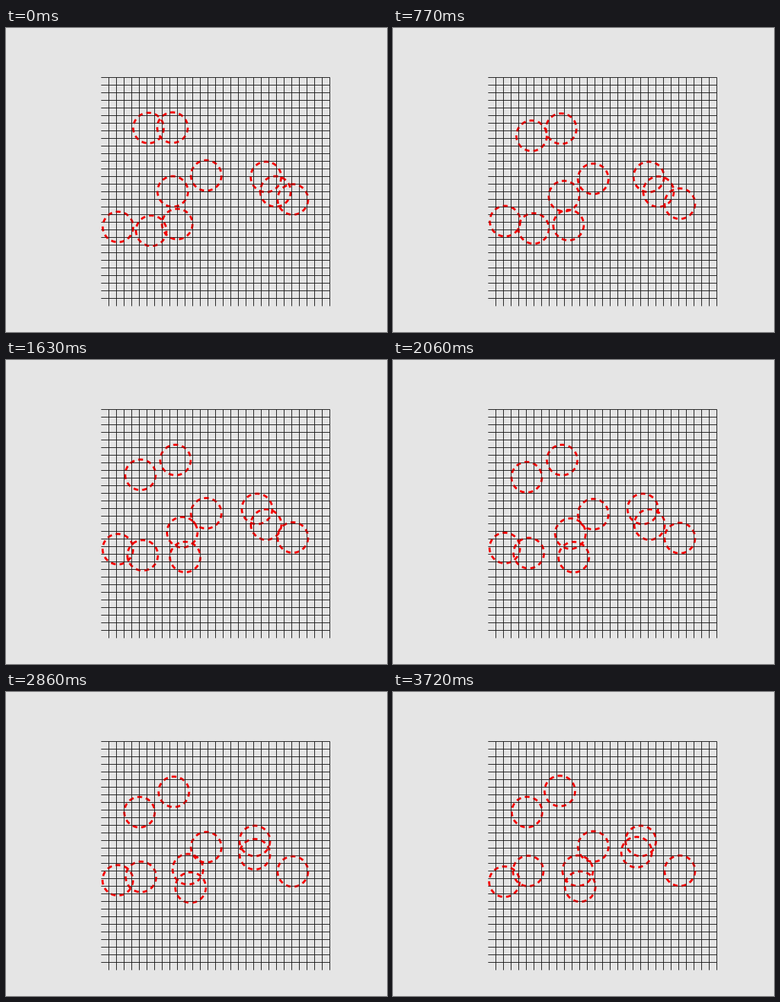
A matplotlib script that plays this animation: 550 px wide and 439 px high, repeating every 3840 ms.

```python
import numpy as np
import matplotlib.pyplot as plt
from matplotlib.animation import FuncAnimation
from matplotlib.collections import LineCollection

W, H, DPI = 550, 439, 64
PX = 72 / DPI  # points per pixel
TICK, LOOP = 20, 3840
BACK, INK, RED = "#e5e5e5", "#1a1a1a", "#f50000"
LEFT, TOP, CELL, CELLS = 137.5, 71.5, 11, 30
RADIUS, DASHES, DASH_SHARE = 22, 11, 0.55
STEPS, SHAKE = 28, 0.5

# The walk runs at an uneven pace: (step, ms)
PACE = [(0, 0), (4, 460), (9, 1070), (13, 1630), (20, 2460), (23, 2860),
        (27, 3720)]

# Each circle drifts along a curve through start, middle and end
DRIFTS = [
    [(206, 144.5), (194, 166), (193.5, 174)],
    [(239.5, 143.5), (244.5, 144.5), (241, 143)],
    [(289, 213), (289, 222), (289, 224.5)],
    [(241, 236), (253.5, 249), (266, 258.5)],
    [(248, 283), (258.5, 285), (270, 280.5)],
    [(209.5, 292), (197.5, 281.5), (195.5, 258.5)],
    [(161.5, 287), (161.5, 272.5), (160.5, 274)],
    [(376, 215), (362.5, 215), (358, 215)],
    [(390, 235.5), (374, 238), (351.5, 232)],
    [(414, 248), (414, 257), (414, 258)],
]


def step_starts():
    steps, times = zip(*PACE)
    return np.interp(np.arange(STEPS), steps, times)


def build_paths():
    """Centres by step and circle; axes that never move do not shake."""
    drifts = np.array(DRIFTS, float)
    start, middle, end = drifts.transpose(1, 0, 2)
    s = np.linspace(0, 1, STEPS)[:, None, None]
    curve = (start * (1 - s) * (1 - 2 * s) + middle * 4 * s * (1 - s)
             + end * s * (2 * s - 1))
    shake = np.random.default_rng(4).normal(0, SHAKE, curve.shape)
    return curve + shake * (np.ptp(drifts, axis=1) > 0)


def dash_arcs():
    """Dashes of one circle around the origin, starting at the right."""
    turn = 2 * np.pi / DASHES
    sweep = np.linspace(0, DASH_SHARE * turn, 6)
    angles = np.arange(DASHES)[:, None] * turn + sweep
    return RADIUS * np.stack([np.cos(angles), np.sin(angles)], axis=-1)


def add_grid(alpha, zorder):
    right, bottom = LEFT + CELL * CELLS, TOP + CELL * CELLS
    cols = LEFT + CELL * np.arange(1, CELLS + 1)
    rows = TOP + CELL * np.arange(CELLS)
    lines = ([[(x, TOP), (x, bottom)] for x in cols]
             + [[(LEFT, y), (right, y)] for y in rows])
    grid = LineCollection(lines, colors=INK, alpha=alpha, linewidths=PX,
                          zorder=zorder)
    grid.set_snap(False)
    ax.add_collection(grid)


fig = plt.figure(figsize=(W / DPI, H / DPI), dpi=DPI, facecolor=BACK)
ax = fig.add_axes([0, 0, 1, 1])
ax.set_xlim(0, W)
ax.set_ylim(H, 0)
ax.axis("off")

# The grid also shows faintly through the circles
add_grid(1, 1)
circles = LineCollection([], colors=RED, linewidths=3 * PX,
                         capstyle="butt", zorder=2)
ax.add_collection(circles)
add_grid(0.5, 3)

STARTS = step_starts()
PATHS = build_paths()
ARCS = dash_arcs()


def draw(frame):
    now = frame * TICK + TICK / 2
    step = np.searchsorted(STARTS, now, side="right") - 1
    segments = PATHS[step][:, None, None, :] + ARCS
    circles.set_segments(segments.reshape(-1, *ARCS.shape[1:]))
    return [circles]


anim = FuncAnimation(fig, draw, frames=LOOP // TICK, interval=TICK,
                     repeat=True, repeat_delay=0)
plt.show()
```
